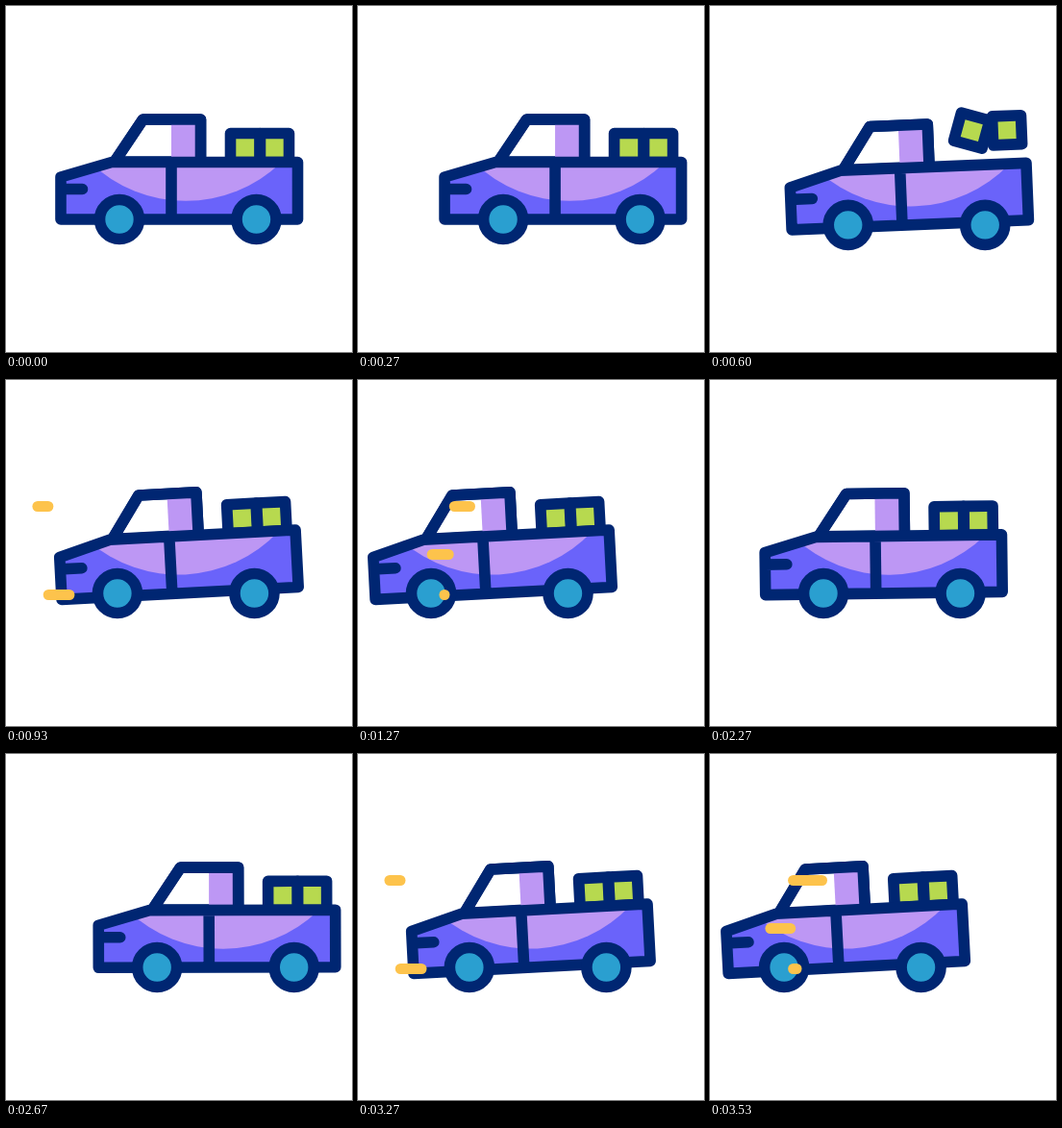
An HTML page that plays this animation: 360x360 px, repeating every 3.59 s.

```html
<!DOCTYPE html>
<html lang="en">
<head>
<meta charset="utf-8">
<title>Pickup truck</title>
<style>
html, body { margin: 0; width: 100%; height: 100%; overflow: hidden; background: #fff; }
svg { display: block; width: 100%; height: 100%; }
.ink { stroke: #002672; stroke-width: 11.6; stroke-linecap: round; stroke-linejoin: round; }
.line { stroke: #fdc34c; stroke-width: 11; stroke-linecap: round; }
</style>
</head>
<body>
<svg viewBox="0 0 360 360">
  <g id="truck">
    <g id="body" class="ink" fill="none">
      <rect id="boxA" x="233.500" y="132.500" width="30.500" height="30" fill="#b7d94f"/>
      <rect id="boxB" x="264.500" y="132.500" width="30" height="30" fill="#b7d94f"/>
      <path d="M113 162 142.500 118H202.500V162Z" fill="#fff"/>
      <path d="M172 123H198V158H172Z" fill="#bd97f4" stroke="none"/>
      <path d="M113 162 142.500 118H202.500V162"/>
      <path d="M57 178 110 162.500H303.500V222H57Z" fill="#6a63fa" stroke="none"/>
      <path d="M88 163A143 143 0 0 0 286 163Z" fill="#bd97f4" stroke="none"/>
      <path d="M57 178 110 162.500H303.500V222H57ZM172 163V222M57 190.500H79.500"/>
    </g>
    <g class="ink" fill="#2a9fd0">
      <circle cx="118" cy="222" r="20.500"/>
      <circle cx="260.500" cy="222" r="20.500"/>
    </g>
  </g>
  <g id="lines"></g>
</svg>
<script>
const LOOP = 3590, CYCLE = 2333, STEP = 66.5, FRAME = 1000 / 15;
const $ = id => document.getElementById(id);

// Keys are [time, value] pairs joined by sine easing.
const driveKeys = [[0, 0], [367, 40], [400, 40], [633, 25], [690, 25],
  [1245, -42], [1467, -42], [2250, 0], [CYCLE, 0]];
const dropKeys = [[400, 0], [533, 9], [700, 0]];
const tiltKeys = [[267, 0], [750, -3], [2133, -3], [CYCLE, 0]];

// Speed lines: height, path ends, head times, tail times.
const speedLines = [
  { y: 131.5, from: 28.5, to: 116.5, head: [840, 1180], tail: [850, 1430] },
  { y: 181.5, from: 25, to: 95, head: [950, 1290], tail: [945, 1430] },
  { y: 223.5, from: 34, to: 90, head: [770, 1070], tail: [800, 1275] }
];
for (const line of speedLines) {
  line.node = document.createElementNS('http://www.w3.org/2000/svg', 'path');
  line.node.setAttribute('class', 'line');
  $('lines').append(line.node);
}

function tween(keys, t) {
  if (t <= keys[0][0]) return keys[0][1];
  for (let i = 1; i < keys.length; i++) {
    const [t0, a] = keys[i - 1], [t1, b] = keys[i];
    if (t < t1) return a + (b - a) * (1 - Math.cos(Math.PI * (t - t0) / (t1 - t0))) / 2;
  }
  return keys[keys.length - 1][1];
}

const transform = (id, value) => $(id).setAttribute('transform', value);

function draw(t) {
  transform('truck', `translate(${tween(driveKeys, t)} ${tween(dropKeys, t)})`);
  transform('body', `rotate(${tween(tiltKeys, t)} 180 166)`);

  const hop = Math.max(0, 1 - ((t - 533) / 100) ** 2);
  transform('boxA', `translate(${-hop} ${-38 * hop}) rotate(${32 * hop} 249 147.5)`);
  transform('boxB', `translate(${10 * hop} ${-36 * hop})`);

  for (const { node, y, from, to, head, tail } of speedLines) {
    const at = ([start, end]) => tween([[start, from], [end, to]], t);
    const x0 = at(tail), x1 = at(head);
    node.setAttribute('d', x1 > x0 ? `M${x0} ${y}H${x1}` : '');
  }
}

function tick() {
  const frame = Math.floor(performance.now() % LOOP / STEP);
  draw(Math.min(frame, 53) * FRAME % CYCLE);
  requestAnimationFrame(tick);
}
tick();
</script>
</body>
</html>
```
